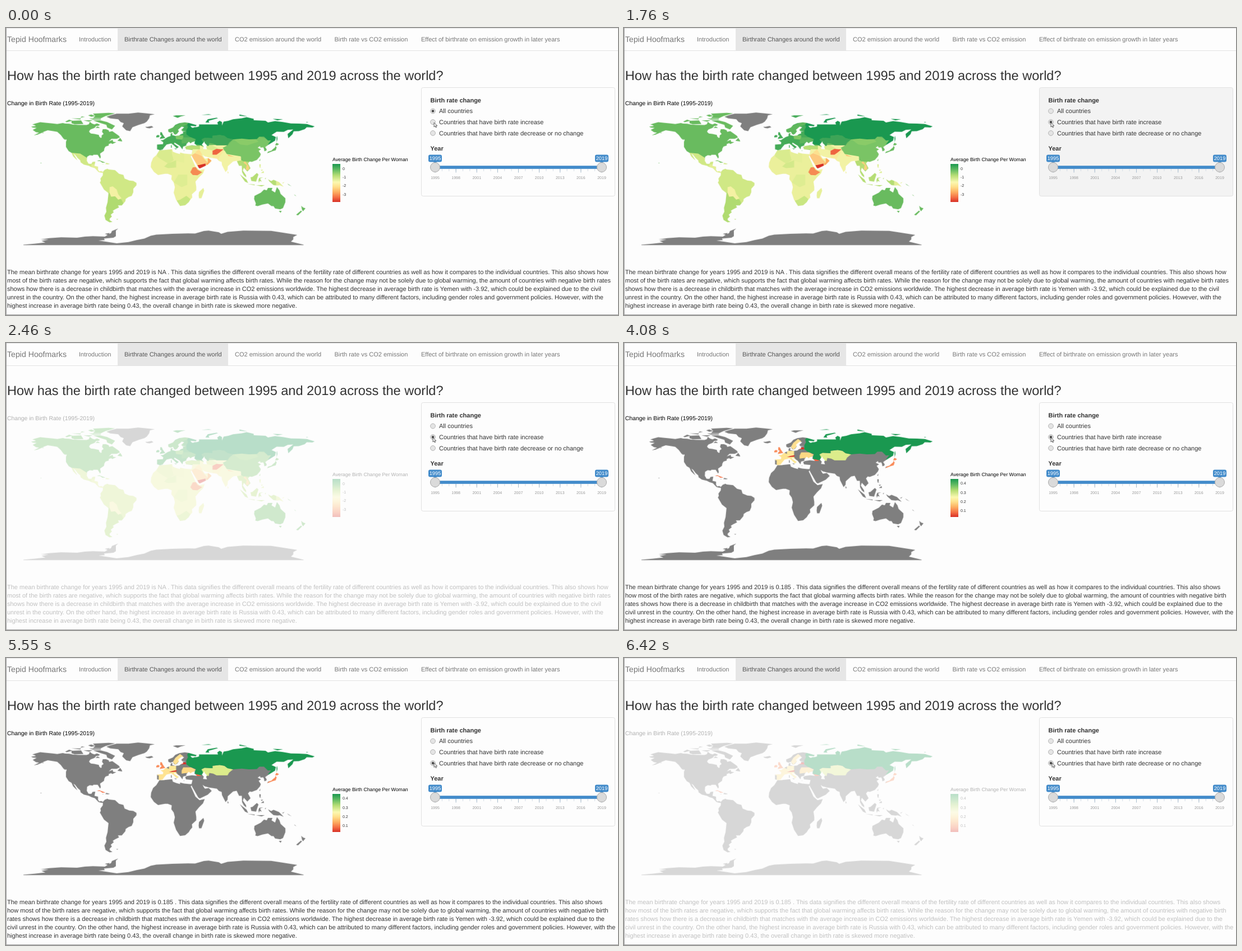
Animation, 1091 px wide and 513 px high, one loop 8000 ms. Source, as an HTML page:

```html
<!DOCTYPE html>
<html lang="en">
<head>
<meta charset="utf-8">
<title>Birth rate changes</title>
<style>
html, body { margin: 0; width: 100%; height: 100%; overflow: hidden; background: #fdfdfd; }
svg { display: block; width: 100%; height: 100%; font: 11px "Liberation Sans", Arial, sans-serif; fill: #333; text-rendering: geometricPrecision; }
.nav { fill: #777; }
.small { font-size: 7px; }
.bold { font-weight: bold; }
.year { font-size: 9.3px; fill: #fff; text-anchor: middle; }
.scale { font-size: 7px; fill: #999; text-anchor: middle; }
.radio { fill: #e4e4e4; stroke: #b4b4b4; }
.handle { fill: #dadada; stroke: #aaa; }
.plot, .copy, .before, .after, #panel, #dot, #cursor { animation: 8s step-end infinite; }
.plot { animation-name: plot; }
.copy { animation-name: copy; }
.before { animation-name: before; }
.after { animation-name: after; }
#panel { animation-name: panel; stroke: #e1e1e1; }
#dot { animation-name: dot; }
#cursor { animation-name: cursor; }
@keyframes plot {
  0%, 51% { opacity: 1 }
  27.25% { opacity: .95 }
  30.75%, 80.25%, 100% { opacity: .3 }
}
@keyframes copy {
  0%, 51% { opacity: 1 }
  30.75%, 80.25%, 100% { opacity: .3 }
}
@keyframes before { 0% { visibility: visible } 51%, 100% { visibility: hidden } }
@keyframes after { 0% { visibility: hidden } 51%, 100% { visibility: visible } }
@keyframes panel {
  0%, 30.75%, 80.25%, 100% { fill: #fdfdfd }
  22%, 71.125% { fill: #f3f3f3 }
}
@keyframes dot {
  0% { transform: translateY(0) }
  18.5% { transform: translateY(19.6px) }
  69.375%, 100% { transform: translateY(39.4px) }
}
@keyframes cursor {
  0% { transform: translate(763px, 169px) }
  3.75% { transform: translate(763px, 170px) }
  6.125% { transform: translate(762px, 172px) }
  8% { transform: translate(761px, 172px) }
  9.75% { transform: translate(761px, 170px) }
  11.375% { transform: translate(761px, 169px) }
  58.75% { transform: translate(763px, 178px) }
  62.375% { transform: translate(763px, 187px) }
  64.125% { transform: translate(763px, 188px) }
  66%, 100% { transform: translate(763px, 187.5px) }
}
</style>
</head>
<body>
<svg viewBox="0 0 1091 513" preserveAspectRatio="none">
<defs>
  <linearGradient id="ramp" x2="0" y2="1">
    <stop stop-color="#1a9850"/>
    <stop offset=".16" stop-color="#66bd63"/>
    <stop offset=".3" stop-color="#b5dd74"/>
    <stop offset=".48" stop-color="#fbf8b0"/>
    <stop offset=".6" stop-color="#fee08b"/>
    <stop offset=".74" stop-color="#fdae61"/>
    <stop offset=".88" stop-color="#f46d43"/>
    <stop offset="1" stop-color="#d73027"/>
  </linearGradient>

  <!-- coastlines, in degrees of longitude and latitude -->
  <clipPath id="land">
    <!-- Alaska and Canada -->
    <path d="M-168 65.6-162 66.5-163.5 67.5-166.5 68.3-163 69.5-156.5 71.3-150 70.5-141 69.7-135 69-128 70.3-125 69.6-120 69.4-115 68.3-109 68-98 67.8-95 68.8-94 71.8-91 69.5-88 68.5-85 69.7-81.5 68.5-82 67-86 66.3-88 64-93 62-94.7 60-94.5 58.7-92.5 57-88 56.5-82.5 55.2-82 53-80 51.3-79 52-79 54.5-76.5 56.5-78.5 59-77.5 62.4-73.5 62.4-70 61-69.5 59-65.5 60-62 57.5-57 54-56 52-60 50.2-66.5 50.2-70 47-65 49-64.5 46.5-60.5 46-65.5 43.6-67 44.8-75 43-123 46-123 49-127.5 51-130.5 55-135 59-140 60-147 61-151.5 59.5-154 58-160 55.5-164.7 54.6-158 58-162 58.7-166 61.6-161 64-166 64.5Z"/>
    <!-- United States to Panama -->
    <path d="M-123 49-68 47-67 44.8-70 43.6-70 41.7-74 40.5-75.5 38-76 35-81 31.5-80 27-81 25.2-82.7 28-84 30-89.5 30-90 29-94 29.5-97.3 27.5-97.7 22.5-95.5 18.7-92 18.6-90.4 21-87 21.4-88 16-83.5 15-83.5 11-82 9-79.5 9.5-77.4 8.5-77.5 7.2-80 7.4-83 8.2-87.5 13-92 14.5-95 16-101.5 17.6-105.5 20.4-106 23-109.4 26-112.5 30-114.7 31.5-112.5 28-109.5 23-112 25-115 28-117 32.5-120.6 34.6-124 40-124 46.5Z"/>
    <!-- Arctic islands -->
    <path d="M-90 73.5-81 73.7-72 71.5-62 66.7-66 62-72 64.5-73 68-80 70ZM-90 76.5-80 76.2-74 79-62 82.5-70 83.1-90 82-87 79ZM-117 70-117 73-105 73.5-102 69-113 68.6ZM-125 72-123 71.2-116 73.2-120 74.5ZM-95 76-90 74.7-80 74.7-80 75.7ZM-117 76-106 74.8-105 76ZM-102 73.5-90 73.8-95 72ZM-96 80-92 81-87 79-92 78.2ZM-104 78.5-100 78-106 77ZM-87 64-81 64-84 66ZM-59 47.7-53 46.8-53.5 48.5-55.5 51.5ZM-128 50.7-124 48.4-125 50ZM-154 57.3-152 57.5-153 58.2Z"/>
    <!-- Greenland, Iceland, Caribbean, Hawaii -->
    <path d="M-73 78.2-68 80-60 82-45 82-33 83.5-22 82.5-12 81.3-18 80-19 76-22 72-25 70-32 68-40 65-43 60-48 61-53 66-51 70-55 71.5-58 75-68 76ZM-24 65.5-22 64-18.5 63.5-13.6 65-16 66.5-21 65.5ZM-85 22-82 23.2-74 20.2-78 19.9-81 22ZM-74.4 18.3-73 19.8-68.5 18.6-71 18ZM-78 18-76.5 18-77.5 18.5ZM-156 19-154.8 19.5-156 20.2Z"/>
    <!-- South America -->
    <path d="M-77.4 8.5-75 11-71.7 12.3-70 11.5-62 10.6-57 6-51.5 4.5-50 0-44-2.5-39-3-35-5.5-35-8.5-39-13-39-17.5-41-22-45-23.5-48.6-26-49-28.7-53.5-34-58.4-34-57-36.5-62-39-65-41-63.6-42.5-67.5-46-66-48-69-51-68.5-53-65.3-55-69-55.5-74-52.5-75.5-47-73-42-73.5-37-71.5-30-70.3-18.5-76-14-79.5-8-81.2-5-80-3-80.5 0-77.5 4ZM-61-51.5-58-51.3-59-52.2Z"/>
    <!-- Africa -->
    <path d="M-6 35.8 0 36 10 37.2 11 34 15 32.3 20 31 20 32.8 25 31.7 32 31 34.5 31 35 29.5 33.5 28 35.5 24 37.3 20 39.5 15 43 12 44.5 10.5 51.2 12 49 6.5 44 1.5 39.5-4 40.5-10.5 40.5-15 35-20 35.5-24 32.8-27 31-30 26.5-33.8 20-34.8 18.2-32 15-27 12-18 13.5-11 12-5 9-1 9.5 4 4.5 6 1 6-4 5-7.7 4.3-13 8.5-17 14.5-16.5 20-14 26-10 29.5ZM44-17 49.5-12 50.5-15.5 47-25 44-25 43.5-21.5Z"/>
    <!-- Europe and Turkey -->
    <path d="M-9 37-9 43-1.5 43.5-1.2 46-4.7 48.4-1.5 48.7 2 51 4.5 52.5 8 53.7 8.2 57 10.5 57.6 10 55 14 54 19 54.5 21 56 24 57.2 23.5 59.2 30 60 38 65 60 66 60 50 51 47 47.5 43 50 40.3 49 37.5 44 35 36 36 30.5 36.5 27.5 37 26.5 40 29 41.2 35 42 41.5 41.3 38 44.5 39 47 35 46 33.5 44.5 31 46.5 28 43.5 28 41.5 24 40.5 23 37 19.5 41.5 13 45.5 12.5 44 18.4 40 16 38 12 42 9 44.4 3 43 0 39.5-2 36.8-5.5 36Z"/>
    <!-- Scandinavia -->
    <path d="M31 59.5 23 60 21.5 61.5 25.3 65 22 65.7 17.3 61.5 18.7 60 16.5 57 14.3 55.5 12.5 56.3 11 59 8 58 5.3 59 5 62 11 64.5 14 68 19 70 26 71.1 31 70.4 41 67.5 40 66.2 33 66.7 35 64.3 39 64Z"/>
    <!-- British Isles, Mediterranean and northern islands -->
    <path d="M-5.5 50 1.4 51.2 0 53-2 56-3 58.6-5 58.5-5 55-3 54-5 52ZM-10 52-6.3 52.3-6 54.5-8 55.2-10 54ZM8.5 39 9.7 39 9.3 43 8.6 42ZM12.5 38 15.5 38 15 36.8ZM24 35.3 26 35.2 25 34.9ZM52 71 57 70.8 56 73 68 76.5 66 77 55 75ZM11 79 17 76.8 21 78.5 27 80 15 80ZM95 79.5 105 78.5 100 80 95 81ZM137 75.5 150 75 143 73.5ZM47 80.5 60 80.6 56 81.4ZM179 71 182 71 180 71.6Z"/>
    <!-- Siberia -->
    <path d="M38 63 40 64.7 44 66 44 68.5 54 68.5 60 68.5 68 68.5 67 71 70 73 73 71.5 73 67 75 72 81 73 87 75 98 76.3 104 77.7 113 75.5 113 73.7 128 73 131 71 140 72.7 150 71.5 160 69.7 170 69.5 180 69 190 66 187 64.5 180 65 177.5 62.5 170 60 163.5 59.7 162 56 156.7 51 155.8 56.5 163 62 156 61.5 151 59 142 59.3 135.5 55 141 52.5 140 48 132 43 54 44 51 47 45 50Z"/>
    <!-- Southern Asia -->
    <path d="M51 47 135 47 132 43 127.5 39.8 129.4 37 129 35.3 126.5 34.5 126 37.5 125 39.5 121.5 39 121 41 118 39 122.3 37 119.3 35 122 31 121 28 117 23.5 110.5 21 108 21.5 105.8 19 109 13 105 8.7 100.5 13.5 99.3 10 103.4 4 103.5 1.4 100.5 4 98.3 8 98 16 94.5 16 91.5 22.5 87 21.5 80.3 15.5 80 11 77.5 8 73 17 72.5 21 69 22.3 66.5 25 57 26.5 51 28 48.5 30 50 27 51.5 25 56.3 26 60 22.3 55 17.5 45 12.7 43 14 39 21 35 28 34.5 31 36 37 49 37.5 54 37 53 40 54 42 51 45Z"/>
    <!-- Pacific rim islands -->
    <path d="M130 32 131 34 135.5 35.3 137 37 140 39.5 140.5 41.3 142 39.5 140.8 35.7 137 34.6 133 33ZM140 42 141.7 45.3 145 43.5 143 42ZM142 46 143 50 142.5 54 141.8 52ZM120 23 121.5 25 121 22ZM80 6.5 81.5 7 80 9.7ZM120 18 122 18 121.5 14 124 13 120.5 14ZM122 7 126 7 125.5 9.5ZM122 11 125 11 123 9.5Z"/>
    <path d="M95.5 5.5 104-1.5 106-5.8 102-4ZM105-6.8 114.5-7.6 114-8.6ZM109 1.5 111.5 2 117 7 119 5 116-4 110-3ZM120 .8 125 1.5 121 0 123-4 120.5-3 119.5-5.5 119-2ZM116-8.5 123-8.3 127-8.4 123-10ZM127 0 128.5 1 128-1ZM131-1 135-3.3 138-1.7 145-4.5 150.8-10.5 146-8.5 143-9 138-8.3 133-4ZM149-5.5 152-4.3 150-6.2ZM155-6 161-10 157-8ZM164-20 167-22.3 165-21.5Z"/>
    <!-- Australia and New Zealand -->
    <path d="M114-22 122-18 126-14 129.5-15 131-12 136.7-12 135.5-15 140-17.7 142.3-10.8 145.5-15 147-19.5 153-25 153-30 150-37.5 146.5-39 140-38 138-35 135.5-35 131-31.5 124-33 118-35 115-34.2 115.7-31.5 113.5-26ZM144.7-41 148.3-41 147-43.5ZM173-34.5 175-36.5 178.4-37.8 175.3-41.5 174-39.5ZM172.7-40.6 174-41.7 169-46.6 166.5-46Z"/>
    <!-- Antarctica -->
    <path d="M-178-83.9-164-82.5-150-81-155-79-146-77.5-156-77-145-75.5-130-74.5-110-75-100-73.5-90-73-75-73.5-67-69-66-66.5-58-63.3-61-66-61-73-64-75-76-76-75-78-83-78.5-60-82-45-80.5-35-78-25-76-17-72.5-10-71 10-70 30-69.5 39-69.7 50-66.5 56-66 69-68 72-70 80-67.5 100-66 135-66.3 150-68.5 168-71.5 163-74 163-77 160-80 176-83.9 176-84.3-178-84.3ZM-75-70-69-69-70-72Z"/>
  </clipPath>

  <path id="russia" fill="#1a9850" d="M30 70 29 68 30 65 28 61 28 56 32 53 40 50 39 47 38 45 40 43.4 48 42 49 46 47 49.5 51 51.5 61 51 61 54 70 55 76 54 80 51 87 49.5 98 50.5 107 49.5 117 50 120 53 126 53 131 48 135 48.5 131 43 133 42 141 46 145 46 158 50 195 60 195 72 150 82 40 82 40 72Z"/>
  <path id="kazakhstan" d="M51 51.5 61 51 61 54 70 55 76 54 80 51 87 49.5 82 45.5 80 42 66 42 62 44 57 45 56 41 52 42 48 45 47 49.5Z"/>
  <path id="cuba" d="M-86 19.8H-74V23.6H-86Z"/>
  <path id="ukraine" d="M22 48 24 52 34 52 40 49 35 44 28 45 22 44Z"/>
</defs>

<rect width="1091" height="513" fill="#fdfdfd"/>
<path d="M0 40.5H1091M0 .5H1091" stroke="#e2e2e2"/>
<rect x="199" y="1" width="197" height="39" fill="#e6e6e6"/>
<path d="M.5 0V513M0 512.5H1091" stroke="#a0a0a0"/>

<g class="nav">
  <text x="2" y="25" font-size="14.13">Tepid Hoofmarks</text>
  <text x="130" y="24">Introduction</text>
  <text x="211" y="24" fill="#555">Birthrate Changes around the world</text>
  <text x="408" y="24">CO2 emission around the world</text>
  <text x="585.5" y="24">Birth rate vs CO2 emission</text>
  <text x="740" y="24">Effect of birthrate on emission growth in later years</text>
</g>
<text x="2" y="93" font-size="23.56">How has the birth rate changed between 1995 and 2019 across the world?</text>

<g class="plot">
  <text x="2" y="137.5" font-size="10.4" fill="#000">Change in Birth Rate (1995-2019)</text>
  <g transform="translate(282 269) scale(1.412 -1.412)">
    <g class="before" clip-path="url(#land)">
      <path fill="#69bb5f" d="M-180-90H200V90H-180Z"/>
      <path fill="#d0e885" d="M-117 32.5-106 31.5-97 25.9-90 24-60 24-30 0-30-60-120-60Z"/>
      <path fill="#e2ee95" d="M-92 14-92 18-77 18-77 7-90 7Z"/>
      <path fill="#b0db70" d="M-74-18-69-18-67-23-62-22.5-57-26-54-26.5-50-35-60-60-80-60Z"/>
      <path fill="#f4f1a3" d="M-69-11-65-10-60-14-58-20-54-25-58-27-62-22.5-67-23-69-18Z"/>
      <use href="#cuba" fill="#7cc567"/>
      <path fill="#ebf09b" d="M-20 37.5 11 37.5 34 31.5 43 12 55 12 55-36-20-36Z"/>
      <path fill="#d9eb8e" d="M-9 36 9 38 10 30 12 23 5 19-5 25-9 28Z"/>
      <path fill="#e6ef98" d="M10 34 25 33 25 20 12 23Z"/>
      <path fill="#d3e98a" d="M0 15 4 19 15 23 15 14 5 13Z"/>
      <path fill="#deed92" d="M12-5 18 5 29 5 29-8 22-11Z"/>
      <path fill="#c9e681" d="M16-28 20-27 28-22 33-26 33-36 16-36Z"/>
      <path fill="#e6ef98" d="M42-10H52V-27H42Z"/>
      <path fill="#f58a53" d="M33 8 36 14 40 14.5 42 11 48 8 42 4 36 4.5Z"/>
      <path fill="#45ab58" d="M-12 35-3 35.9 11 38 20 34 27 36 27 42 40 42 50 45 60 60 35 82 0 82-12 60Z"/>
      <path fill="#5fb75d" d="M4 58 12 55 24 60 24 66 32 70 25 72 5 63Z"/>
      <path fill="#80c866" d="M14 54.5 24 54.5 24 49 15 50Z"/>
      <use href="#ukraine" fill="#5cb55d"/>
      <path fill="#b9df76" d="M26 36 27 42 45 41.5 45 37Z"/>
      <path fill="#f2f2a4" d="M33 31 36 37 45 37 45 42 50 40 52 42 80 43 75 36 97 28 98 5 60 5 43 11Z"/>
      <path fill="#fdc97e" d="M34 29 39 32 47 29 51 24 55 20 44 16.5 42 17Z"/>
      <path fill="#fde08f" d="M39 33 44 37 48 30 46 29Z"/>
      <path fill="#fcaa60" d="M55 26 60 23 55 16.5 52 18.5 55 20Z"/>
      <path fill="#d73027" d="M42 17 44 17 52 19 53 15 44 12.3Z"/>
      <path fill="#f9e999" d="M61 25 62 29.5 66 30 71 34 75 35 70 28 68 23Z"/>
      <path fill="#d9ec8d" d="M52 42 60 42 68 38 61 35.5 54 37Z"/>
      <path fill="#ee6440" d="M61 35 66 37.5 71 37 75 37 70 33 66 30 61 30Z"/>
      <path fill="#b5dd74" d="M92 22 98 23 108 21.5 130 19 130 5 135 2 141 0 141-10 130-12 95-9Z"/>
      <path fill="#fbd07f" d="M100 20 102 22 107 15 107 11 103 11 104 17Z"/>
      <path fill="#dcee92" d="M117 20H128V5H122Z"/>
      <path fill="#e2ee96" d="M141 0H156V-10.7H141Z"/>
      <path fill="#7ac465" d="M74 39 80 42 87 49.5 98 51 120 53 135 49 131 42 125 38 123 20 108 21 99 22 97 28 79 31Z"/>
      <path fill="#8acb68" d="M88 49 98 52 116 50 119 46.5 105 42 96 43Z"/>
      <path fill="#fdbe70" d="M80 30.5 88 27.5 81 28.5Z"/>
      <use href="#kazakhstan" fill="#3ea457"/>
      <use href="#russia"/>
      <path fill="#7f7f7f" d="M-75 76-66 81-58 84H-10V59H-50L-60 74ZM-180-60H200V-90H-180Z"/>
    </g>
    <g class="after" clip-path="url(#land)">
      <path fill="#7f7f7f" d="M-180-90H200V90H-180Z"/>
      <path fill="#fee391" d="M-9 42H-7V36H0L4 42 8 44 8 49 2 52-6 49Z"/>
      <path fill="#fde896" d="M6 49 6 54 15 54 15 46 19 40 16 37.5 7 44Z"/>
      <path fill="#f98a58" d="M-12 49 2 51 2 60-12 60ZM128 30 134 36 139 42 139 46 146 46 146 34Z"/>
      <path fill="#fee090" d="M11 59 14 55 19 60 24 66 20 69 14 64Z"/>
      <use href="#ukraine" fill="#fdd884"/>
      <path fill="#d73027" d="M6 46 10 47.5 16 48.5 15 46.5ZM21 56 28 56 27 58.5 21 58Z"/>
      <use href="#cuba" fill="#f67a50"/>
      <use href="#kazakhstan" fill="#dcec8b"/>
      <use href="#russia"/>
      <path fill="#f0623e" d="M40 43.5 47 42 45 41 41 41Z"/>
    </g>
  </g>
  <text x="582" y="237.5" font-size="8.77" fill="#000">Average Birth Change Per Woman</text>
  <rect x="582" y="243" width="14" height="68" fill="url(#ramp)"/>
  <g class="before small">
    <text x="600" y="254">0</text><text x="600" y="269">-1</text>
    <text x="600" y="284">-2</text><text x="600" y="299.5">-3</text>
  </g>
  <g class="after small">
    <text x="600" y="253">0.4</text><text x="600" y="269.5">0.3</text>
    <text x="600" y="286">0.2</text><text x="600" y="302">0.1</text>
  </g>
</g>

<g class="copy">
  <g class="before">
    <text x="2" y="440">The mean birthrate change for years 1995 and 2019 is NA . This data signifies the different overall means of the fertility rate of different countries as well as how it compares to the individual countries. This also shows how</text>
    <text x="2" y="455">most of the birth rates are negative, which supports the fact that global warming affects birth rates. While the reason for the change may not be solely due to global warming, the amount of countries with negative birth rates</text>
    <text x="2" y="470">shows how there is a decrease in childbirth that matches with the average increase in CO2 emissions worldwide. The highest decrease in average birth rate is Yemen with -3.92, which could be explained due to the civil</text>
    <text x="2" y="485">unrest in the country. On the other hand, the highest increase in average birth rate is Russia with 0.43, which can be attributed to many different factors, including gender roles and government policies. However, with the</text>
  </g>
  <g class="after">
    <text x="2" y="440">The mean birthrate change for years 1995 and 2019 is 0.185 . This data signifies the different overall means of the fertility rate of different countries as well as how it compares to the individual countries. This also shows</text>
    <text x="2" y="455">how most of the birth rates are negative, which supports the fact that global warming affects birth rates. While the reason for the change may not be solely due to global warming, the amount of countries with negative birth</text>
    <text x="2" y="470">rates shows how there is a decrease in childbirth that matches with the average increase in CO2 emissions worldwide. The highest decrease in average birth rate is Yemen with -3.92, which could be explained due to the</text>
    <text x="2" y="485">civil unrest in the country. On the other hand, the highest increase in average birth rate is Russia with 0.43, which can be attributed to many different factors, including gender roles and government policies. However, with the</text>
  </g>
  <text x="2" y="500">highest increase in average birth rate being 0.43, the overall change in birth rate is skewed more negative.</text>
</g>

<rect id="panel" x="740.5" y="106.5" width="345" height="194" rx="3"/>
<text class="bold" x="756.5" y="133">Birth rate change</text>
<g class="radio">
  <circle cx="761" cy="148.5" r="4.4"/><circle cx="761" cy="168.1" r="4.4"/><circle cx="761" cy="187.9" r="4.4"/>
</g>
<circle id="dot" cx="761" cy="148.5" r="2.2" fill="#444"/>
<text x="772" y="152.3">All countries</text>
<text x="772" y="172">Countries that have birth rate increase</text>
<text x="772" y="191.7">Countries that have birth rate decrease or no change</text>
<text class="bold" x="756.5" y="219">Year</text>

<path d="M764.5 254H1063" stroke="#d3dce5" stroke-width="4" stroke-dasharray="1 11.375"/>
<path d="M764.5 255H1063" stroke="#a9bccd" stroke-width="7" stroke-dasharray="1 36.125"/>
<g fill="#428bca">
  <rect x="765" y="246.2" width="297" height="5.6"/>
  <path d="M762 239H768L765 243ZM1059 239H1065L1062 243Z"/>
  <rect x="753" y="226.5" width="24" height="13" rx="3"/>
  <rect x="1050" y="226.5" width="24" height="13" rx="3"/>
</g>
<g class="year"><text x="765" y="236.3">1995</text><text x="1062" y="236.3">2019</text></g>
<g class="handle"><circle cx="765" cy="249" r="8.5"/><circle cx="1062" cy="249" r="8.5"/></g>
<g class="scale" id="years"></g>
<path id="cursor" d="M0 0V8L2 6.2 3.3 9 4.5 8.4 3.3 5.8H6Z" fill="#eee" stroke="#444" stroke-width=".8"/>
</svg>
<script>
const years = document.getElementById('years');
for (let i = 0; i < 9; i++) {
  const label = document.createElementNS(years.namespaceURI, 'text');
  label.setAttribute('x', 765 + 37.125 * i);
  label.setAttribute('y', 269.5);
  label.textContent = 1995 + 3 * i;
  years.append(label);
}
</script>
</body>
</html>
```
